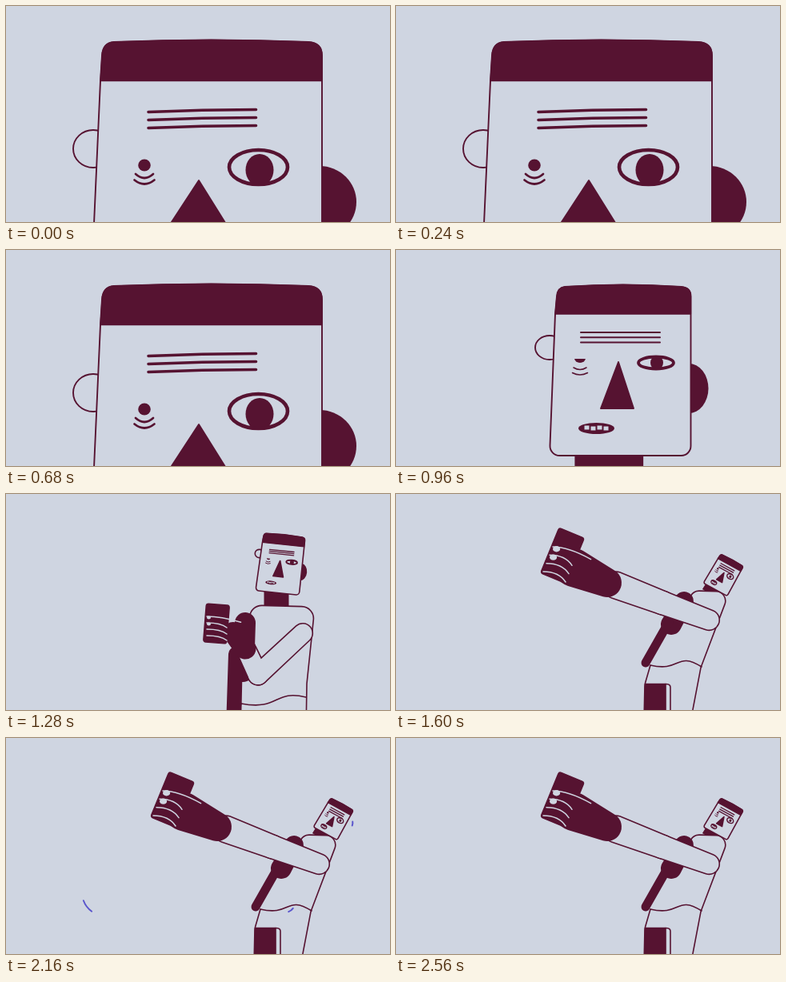
An HTML page with a canvas that plays this animation: 480 px wide and 270 px high, repeating every 2.64 s.

```html
<!DOCTYPE html>
<html lang="en">
<head>
<meta charset="utf-8">
<title>Selfie</title>
<style>
html, body { margin: 0; width: 100%; height: 100%; overflow: hidden; background: #cfd5e1; }
canvas { display: block; width: 480px; height: 270px; }
</style>
</head>
<body>
<canvas id="stage" width="480" height="270"></canvas>
<script>
const ctx = document.getElementById('stage').getContext('2d');
const LOOP = 2640, STEP = 80;
const PAPER = '#cfd5e1', INK = '#561331', BLUE = '#5a55cc';
const BODY_SCALE = 0.3615;
const FOCUS = { x: 378.6, y: 49.6 };

const clamp = v => Math.max(0, Math.min(1, v));
const mix = (a, b, k) => a + (b - a) * k;
const mixAll = (a, b, k) => a.map((v, i) => mix(v, b[i], k));
const span = (t, from, to) => clamp((t - from) / (to - from));

// Builds a path in the current transform but strokes it at screen width.
function paint(build, fill, stroke, width) {
  ctx.beginPath();
  build();
  if (fill) { ctx.fillStyle = fill; ctx.fill(); }
  if (stroke) {
    ctx.save();
    ctx.resetTransform();
    ctx.strokeStyle = stroke;
    ctx.lineWidth = width;
    ctx.stroke();
    ctx.restore();
  }
}

function local(x, y, angle, draw) {
  ctx.save();
  ctx.translate(x, y);
  ctx.rotate(angle);
  draw();
  ctx.restore();
}

const oval = (x, y, rx, ry) => ctx.ellipse(x, y, rx, ry, 0, 0, 7);

function arch(x1, y1, cx, cy, x2, y2) {
  ctx.moveTo(x1, y1);
  ctx.quadraticCurveTo(cx, cy, x2, y2);
}

// Open line through flat x,y corners, rounded at each bend.
function bent(flat, radius) {
  ctx.moveTo(flat[0], flat[1]);
  for (let i = 2; i < flat.length - 2; i += 2) {
    ctx.arcTo(flat[i], flat[i + 1], flat[i + 2], flat[i + 3], radius);
  }
  ctx.lineTo(...flat.slice(-2));
}

// Tapered capsule between two [x, y, radius] joints.
function limb([ax, ay, ar], [bx, by, br]) {
  const angle = Math.atan2(by - ay, bx - ax);
  const open = Math.acos((ar - br) / Math.hypot(bx - ax, by - ay));
  ctx.arc(ax, ay, ar, angle + open, angle - open + 2 * Math.PI);
  ctx.arc(bx, by, br, angle - open, angle + open);
  ctx.closePath();
}

function drawEars(P, grow, line) {
  const [lx, ly, lrx, lry] = P([109, 178.5, 25, 23.5], [192, 122, 18, 15]);
  const [rx, ry, rrx, rry] = P([392, 245, 46, 45], [366, 173, 24.5, 31]);
  paint(() => oval(lx, ly, lrx * grow, lry), PAPER, INK, line);
  paint(() => oval(rx, ry, rrx * grow, rry), INK);
}

function drawSkull(P, line) {
  const [left, right, top, brow, chin, lean, corner] =
    P([118, 395, 45, 93.5, 384, 13, 17], [199, 368.5, 46, 80, 257, 7, 12]);
  const cap = () => {
    ctx.moveTo(left, brow);
    ctx.lineTo(left + 2, top + corner);
    ctx.quadraticCurveTo(left + 3, top + 1, left + corner, top);
    ctx.quadraticCurveTo((left + right) / 2, top - 5, right - corner, top);
    ctx.quadraticCurveTo(right, top + 1, right, top + corner);
    ctx.lineTo(right, brow);
  };
  paint(() => {
    cap();
    ctx.arcTo(right, chin, left, chin + 1, corner);
    ctx.arcTo(left - lean, chin, left, brow, corner);
    ctx.closePath();
  }, PAPER, INK, line);
  paint(() => { cap(); ctx.closePath(); }, INK, INK, line * 0.7);
}

function drawSmallEye(P, { near, blink, reach, feature }) {
  const [x, y, rx, ry] = P([173, 199, 7.8, 7.5], [230, 135, 7, 6]);
  const lid = mix(mix(191, 196.5, blink), mix(136, 129, reach), near);
  ctx.save();
  ctx.beginPath();
  ctx.rect(x - 20, lid, 40, 40);
  ctx.clip();
  paint(() => oval(x, y, rx, ry), INK);
  ctx.restore();

  const [first, gap, half, sag] = P([210 + 2 * blink, 7.5, 11, 10], [147, 6.5, 8, 5]);
  for (let i = 0; i < 2; i++) {
    const w = half + i * 1.5, bagY = first + i * (gap + 4 * reach);
    paint(() => arch(x - w, bagY, x, bagY + sag, x + w, bagY), null, INK, feature * 0.75);
  }
}

function drawLargeEye(P, { blink, reach, eyeLine }) {
  const [x, y, rx, ry] = P([315.5, 201.5, 36.5, 21.5], [325, 141, 22, 7.5]);
  if (blink > 0.8) {
    paint(() => arch(x - 35, 207, x + 1, 234, x + 36, 207.5), null, INK, eyeLine);
    return;
  }
  const height = ry * (1 - blink) + 8 * reach;
  const [pupilX, pupilY, prx, pry] = P([317, 205, 17.5, 20], [326, 141, 8, 9]);
  ctx.save();
  paint(() => oval(x, y, rx, height), PAPER);
  ctx.clip();
  paint(() => oval(pupilX, pupilY, prx, pry), INK);
  ctx.restore();
  paint(() => oval(x, y, rx, height), null, INK, eyeLine);
}

function drawHead(pose) {
  const { near, blink, reach, feature, line } = pose;
  const P = (close, far) => mixAll(close, far, near);

  if (reach < 0.95) drawEars(P, 1 - reach, line);
  drawSkull(P, line);

  const [from, to, first, gap] = P([178, 312.5, 132.5 + 4 * blink, 10], [231, 330, 103, 6.3]);
  for (let i = 0; i < 3; i++) {
    const y = first + i * (gap + 7 * reach) - 6 * reach;
    paint(() => arch(from, y, (from + to) / 2, y - 3 * (1 - near), to, y - 3 * (1 - near)), null, INK, feature);
  }

  drawSmallEye(P, pose);
  drawLargeEye(P, pose);

  const [tipX, tipY, width, height] = P([241, 218, 66, 101], [278, 140, 22, 58]);
  paint(() => {
    ctx.moveTo(tipX, tipY);
    ctx.lineTo(tipX - width, tipY + height);
    ctx.lineTo(tipX + width - 3, tipY + height);
    ctx.closePath();
  }, INK, INK, line);

  local(mix(200, 250.5, near), mix(350, 223, near), 0, () => {
    paint(() => oval(0, 0, 22.5, 7 + 8 * reach), INK);
    for (let i = 0; i < 4; i++) {
      paint(() => ctx.rect(i * 8 - 15, -3.5 + (i % 2), 6, 5 + 5 * reach), PAPER);
    }
  });
}

function drawHand(at) {
  const [x, y, w, h, angle] = at([263, 162, 29, 48, 0.08], [208, 77, 34, 61, 0.39]);
  local(x, y, angle, () => paint(() => ctx.roundRect(-w / 2, -h / 2, w, h, 3), INK, INK, 1.5));

  const wrist = at([299, 193, 13.5], [264, 111, 18]);
  const palm = at([284, 173, 13], [222, 92, 24]);
  paint(() => limb(wrist, palm), INK);

  const top = at([251, 153], [196, 66]);
  const bottom = at([251, 177], [184, 97]);
  const [reachX, reachY, nail] = at([25, 6, 2.5], [28, 13, 4.6]);
  for (let i = 0; i < 4; i++) {
    const [fx, fy] = mixAll(top, bottom, i / 3);
    const length = i ? 1 : 1.7;
    paint(() => arch(fx, fy, fx + reachX * 0.7, fy, fx + reachX * length, fy + reachY * Math.min(length, 1.2)),
      null, PAPER, 1.5);
    if (i < 2) paint(() => oval(fx + nail, fy + nail * 0.6, nail, nail * 0.8), PAPER);
  }
}

function drawLegs(hipX, hipY, line) {
  local(hipX, hipY, 0, () => {
    paint(() => bent([0, 0, -7, 24, -8, 70], 20), null, INK, line);
    paint(() => ctx.rect(-6.5, 23.5, 25.5, 60), INK, INK, line);
    paint(() => bent([19, 23.5, 25, 24, 25, 80], 4), null, INK, line);
  });
}

function drawBody(reach, line) {
  const at = (folded, stretched) => mixAll(folded, stretched, reach);

  const [nx, ny, cx, cy, neck] = at([338, 122, 338, 140, 31], [401, 108, 391, 124, 19]);
  local(cx, cy, Math.atan2(cy - ny, cx - nx), () =>
    paint(() => ctx.rect(-Math.hypot(cx - nx, cy - ny), -neck / 2, Math.hypot(cx - nx, cy - ny), neck), INK));

  const torso = at([305, 150, 306, 139, 386, 141, 376, 237, 375, 300], [367, 130, 372, 121, 417, 122, 381, 217, 369, 280]);
  const [hipX, hipY, hipEndX, hipEndY] = at([294, 262, 375, 254], [318, 214, 382, 216]);
  const corner = mix(15, 12, reach);
  paint(() => {
    bent(torso, corner);
    ctx.lineTo(hipX, hipY + 60);
    ctx.lineTo(hipX, hipY);
  }, PAPER);
  paint(() => bent(torso, corner), null, INK, line);

  // Far arm, hanging down behind.
  paint(() => limb(at([299, 161, 13], [360, 134, 12]), at([296, 221, 14], [344, 163, 13])), INK);
  paint(() => limb(at([287, 200, 9], [341, 160, 5.5]), at([284.5, 292, 9.5], [312, 211, 5.5])), INK);

  const waist = hipEndX - hipX;
  paint(() => {
    ctx.moveTo(hipX, hipY);
    ctx.bezierCurveTo(hipX + waist * 0.6, hipY + 9, hipX + waist * 0.5, hipY - 18, hipEndX, hipEndY);
  }, null, INK, line);
  drawLegs(hipX, hipY, line);

  const shoulder = at([371, 174, 11.5], [391.5, 157.5, 12]);
  const elbow = at([315, 226, 12], [333, 136, 14]);
  const wrist = at([301, 196, 11.5], [275, 114, 16]);
  const upper = () => limb(shoulder, elbow);
  const fore = () => limb(elbow, wrist);
  paint(upper, null, INK, line * 2);
  paint(fore, null, INK, line * 2);
  paint(upper, PAPER);
  paint(fore, PAPER);
  drawHand(at);
}

// Blue flecks drift out on a ring, each lying along its tangent.
function drawSparks(t) {
  if (t < 1840 || t > 2200) return;
  const center = [260, 90];
  const out = 1 - (1 - span(t, 1680, 2160)) ** 2;
  [[102, 210, 17], [356, 215, 7], [433, 107, 5]].forEach(([x, y, length]) => {
    const tangent = Math.atan2(y - center[1], x - center[0]) - Math.PI / 2;
    const [px, py] = mixAll(center, [x, y], out);
    local(px, py, tangent, () =>
      paint(() => arch(-length / 2, 0, 0, length * 0.15, length / 2, 0), null, BLUE, 2));
  });
}

function draw(t) {
  ctx.resetTransform();
  ctx.fillStyle = PAPER;
  ctx.fillRect(0, 0, 480, 270);
  ctx.lineCap = ctx.lineJoin = 'round';

  const near = span(t, 640, 960) ** 1.6;
  const back = span(t, 960, 1280);
  const reach = 1 - (1 - span(t, 1280, 1560)) ** 1.6;
  const blink = t < 400 ? span(t, 240, 400) : 1 - span(t, 480, 640);
  const zoom = BODY_SCALE ** back;
  const line = mix(1.9, 1.6, back);

  if (near > 0.95) {
    const s = zoom / BODY_SCALE;
    ctx.save();
    ctx.translate(FOCUS.x * (1 - s), FOCUS.y * (1 - s));
    ctx.scale(s, s);
    drawBody(reach, line);
    ctx.restore();
  }

  const away = (1 - zoom) / (1 - BODY_SCALE);
  const far = mixAll([280, 151.5, 0], [343.5, 87.5, 0.105], away);
  const [x, y, tilt] = mixAll(far, [409.5, 101, 0.5], reach);
  local(x, y, tilt, () => {
    ctx.scale(mix(0.31 ** back, 0.192, reach), mix(0.343 ** back, 0.2, reach));
    ctx.translate(-282, -151.5);
    ctx.translate(2 * (1 - away), 0);
    drawHead({
      near, blink, reach, line,
      feature: mix(mix(3.6, 2, near), 1.3, back),
      eyeLine: mix(mix(4.6, 3.8, near), mix(2, 1.4, reach), back)
    });
  });

  drawSparks(t);
}

function tick() {
  const t = performance.now() % LOOP;
  draw(Math.floor(t / STEP) * STEP);
  requestAnimationFrame(tick);
}
tick();
</script>
</body>
</html>
```
